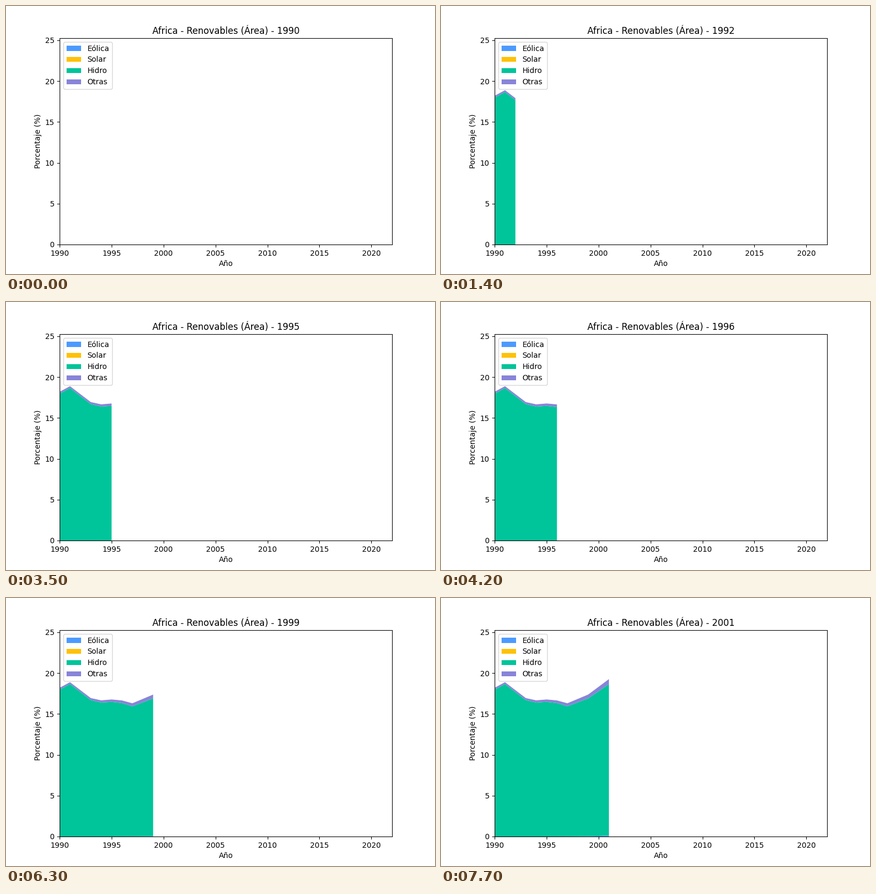
Write a matplotlib script that moves like this. It is 800x500 px and loops after 8 s.

```python
import numpy as np
import matplotlib.pyplot as plt
from matplotlib.animation import FuncAnimation

STEP = 100       # ms per frame
HOLD = 7         # frames per year
FRAMES = 80
START, END = 1990, 2022

LABELS = ["Eólica", "Solar", "Hidro", "Otras"]
COLORS = ["#4C9AFF", "#FFC107", "#00C49A", "#8884D8"]

t = np.arange((FRAMES - 1) // HOLD + 1)   # years since START
years = START + t

# Hydro follows a few turning points; the young sources grow smoothly.
turns = [(0, 17.98), (1, 18.66), (3, 16.7), (4, 16.4), (5, 16.48),
         (6, 16.33), (7, 15.94), (9, 16.9), (11, 18.65)]
wind = 0.12 * np.exp((t - t[-1]) / 1.6)
solar = np.zeros(len(t))
hydro = np.interp(t, *zip(*turns)) - wind
other = 0.22 + 0.39 * (t / t[-1]) ** 2.2
layers = np.array([wind, solar, hydro, other])

plt.rcParams["font.family"] = "DejaVu Sans"
fig, ax = plt.subplots(figsize=(8, 5), dpi=100)


def draw(frame):
    n = frame // HOLD + 1
    ax.clear()
    ax.stackplot(years[:n], layers[:, :n], labels=LABELS, colors=COLORS)
    ax.set_xlim(START, END)
    ax.set_ylim(0, 25.25)
    ax.set_title(f"Africa - Renovables (Área) - {years[n - 1]}")
    ax.set_xlabel("Año")
    ax.set_ylabel("Porcentaje (%)")
    ax.legend(loc="upper left")
    return ax.collections


anim = FuncAnimation(fig, draw, frames=FRAMES, init_func=lambda: draw(0),
                     interval=STEP, repeat=True, repeat_delay=0, blit=False)
plt.show()
```
